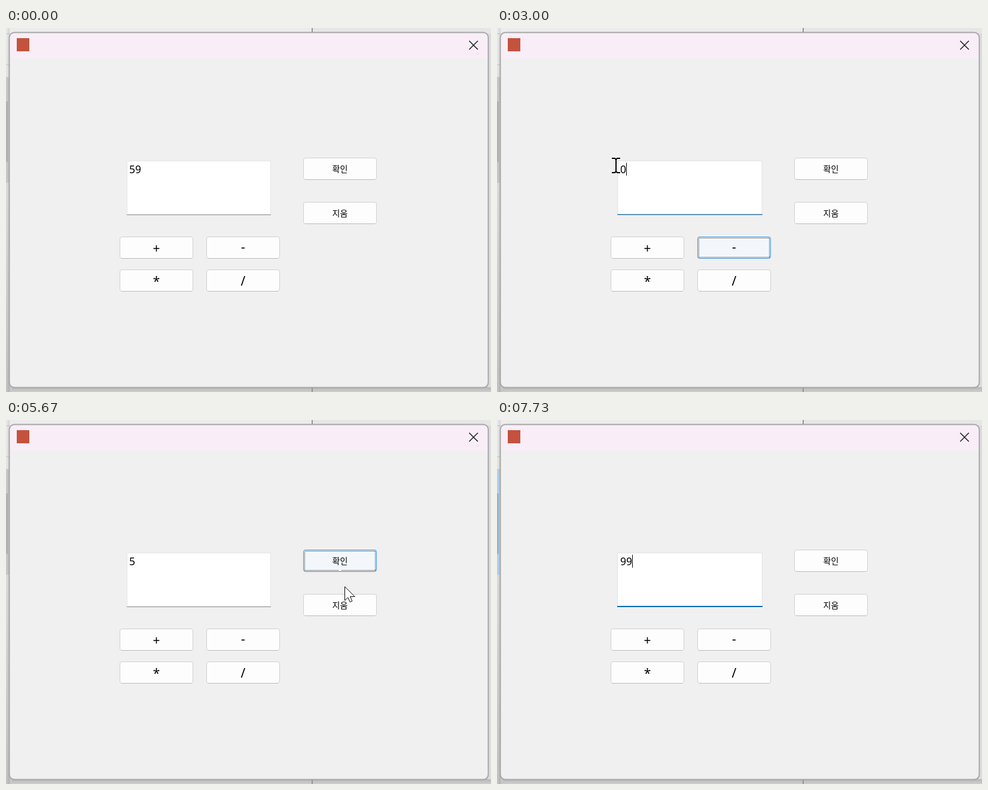
Recreate the animation shown at these times as an HTML page. Size 811 by 609 pixels, loop 8 s.

```html
<!DOCTYPE html>
<html lang="ko">
<head>
<meta charset="utf-8">
<title>Calculator dialog</title>
<style>
  html, body { margin: 0; width: 100%; height: 100%; overflow: hidden; background: #e6e6e6; }
  svg { display: block; width: 811px; height: 609px; }
  text { font-family: "Noto Sans", "Open Sans", sans-serif; font-size: 17.5px; fill: #000; }
  .label { text-anchor: middle; }
  .korean { font-family: "Noto Sans CJK KR", "Noto Sans CJK", sans-serif; font-size: 14px; }
  .sign { font-size: 21px; }
  .base { fill: #fdfdfd; stroke: #d0d0d0; }
  .edge { stroke: #bababa; }
  .default { fill: none; stroke: #0078d4; }
  .hover { fill: #e0eef9; stroke: #0078d4; }
  .press { fill: #cce4f7; stroke: #00457f; }
  .dots { fill: none; stroke: #222; stroke-dasharray: 1 1; shape-rendering: crispEdges; }
</style>
</head>
<body>
<svg id="stage" viewBox="0 0 811 609">
  <defs>
    <linearGradient id="below" x1="0" y1="0" x2="0" y2="1">
      <stop offset="0" stop-color="#b4b4b4"/><stop offset="1" stop-color="#cecece"/>
    </linearGradient>
    <linearGradient id="leftSide" x1="0" y1="0" x2="0" y2="1">
      <stop offset="0" stop-color="#ececec"/><stop offset=".45" stop-color="#dedede"/><stop offset="1" stop-color="#c6c6c6"/>
    </linearGradient>
    <linearGradient id="shade" x1="0" y1="0" x2="1" y2="0">
      <stop offset="0" stop-color="#000" stop-opacity="0"/><stop offset="1" stop-color="#000" stop-opacity=".1"/>
    </linearGradient>
  </defs>

  <!-- desktop behind the dialog -->
  <rect width="811" height="609" fill="#e6e6e6"/>
  <rect width="511" height="9" fill="#ececec"/>
  <rect y="600" width="811" height="9" fill="url(#below)"/>
  <path d="M512 0V9M512 600V609" stroke="#969696" stroke-width="2"/>
  <rect x="805" y="9" width="6" height="592" fill="#dcdcdc"/>
  <rect width="10" height="609" fill="url(#leftSide)"/>
  <path d="M0 9.500H6M0 61.500H6" stroke="#c8c8c8"/>
  <rect id="item" y="82" width="6" height="177"/>
  <rect id="thumb" y="123" width="3" height="101"/>
  <rect width="6" height="609" fill="url(#shade)"/>

  <!-- dialog -->
  <rect x="6" y="8" width="800" height="593" rx="8" fill="#f0f0f0"/>
  <path d="M6 51V16a8 8 0 0 1 8-8H798a8 8 0 0 1 8 8V51Z" fill="#f9eef7"/>
  <rect x="5.500" y="7.500" width="801" height="594" rx="8.500" fill="none" stroke="#a8a8a8" stroke-width="2"/>
  <rect x="18" y="17" width="21" height="22" fill="#c4523e"/>
  <path d="M774.500 21.500l14.500 14.500M789 21.500L774.500 36" stroke="#1a1a1a" stroke-width="1.500"/>

  <!-- edit box -->
  <rect x="202.500" y="222.500" width="240" height="90" fill="#fff" stroke="#e6e6e6"/>
  <path d="M202 312.500H443" stroke="#868686"/>
  <g id="focus">
    <rect x="201.500" y="222.500" width="242" height="90" fill="#fff" stroke="#e3e3e3"/>
    <path d="M201 312H444" stroke="#0067b8" stroke-width="2"/>
  </g>
  <rect id="selection" x="206" y="225" height="22" fill="#0078d7"/>
  <text id="value" x="206" y="243"></text>
  <rect id="caret" y="225.500" height="21.500"/>

  <g id="buttons"></g>

  <path id="arrow" d="M.5 .8V24L5.800 18.900L9.300 26.500L12.900 24.900L9.500 17.500H17.200Z" fill="#fff" stroke="#000"/>
  <path id="beam" d="M-7 -12H-2L0 -10L2 -12H7M0 -10V10M-7 12H-2L0 10L2 12H7" fill="none" stroke="#000" stroke-width="2"/>
</svg>
<script>
const LOOP = 8000, FPS = 15;
const $ = id => document.getElementById(id);
const show = (el, on) => el.setAttribute("visibility", on ? "visible" : "hidden");
const within = (k, ranges) => ranges.some(([from, to]) => k >= from && k < to);
const last = (keys, k) => keys.filter(key => key[0] <= k).pop();

// Linear value of column c in a list of [step, ...values]
function at(keys, k, c = 1) {
  const a = last(keys, k) || keys[0];
  const b = keys.find(key => key[0] > k);
  if (!b || b === a) return a[c];
  return a[c] + (b[c] - a[c]) * (k - a[0]) / (b[0] - a[0]);
}

// All times are in steps of 1/15 s
const values = [[0, "59"], [20, "1"], [23, "10"], [43, "0"], [56, "5"], [98, "0"], [113, "9"], [116, "99"]];
const selected = [[9, 20], [46, 56], [104, 113]];
const caretOn = [[8, 32], [44, 55], [56, 64], [103, 111], [113, 120]];
const editFocus = [[0, 0], [33, 0], [35, 1], [41, 1], [43, 0], [44, 0], [46, 1], [72, 1], [77, 0], [102, 0], [105, 1]];

// Pointer visits: [step, x, y, shape], each with the step at which it vanishes
const visits = [
  { end: 20, keys: [[2, 778, 324, "a"], [3, 640, 318, "a"], [4, 470, 285, "a"], [5, 390, 268, "i"],
    [6, 310, 255, "i"], [8, 232, 239, "i"], [9, 212, 241, "i"], [11, 122, 258, "i"], [12, 103, 263, "a"]] },
  { end: 56, keys: [[32, 116, 262, "a"], [34, 190, 270, "a"], [35, 235, 280, "i"], [37, 335, 305, "i"],
    [38, 382, 341, "a"], [39, 405, 358, "a"], [42, 405, 358, "a"], [43, 360, 322, "a"],
    [44, 262, 250, "i"], [45, 199, 230, "i"], [46, 115, 227, "i"], [47, 60, 224, "a"]] },
  { end: 104.5, keys: [[61, 91, 245, "a"], [64, 188, 252, "a"], [65, 230, 260, "i"], [68, 420, 262, "i"],
    [69, 475, 254, "a"], [71, 547, 242, "a"], [73, 563, 239, "a"], [81, 563, 239, "a"], [83, 564, 252, "a"],
    [87, 567, 304, "a"], [89, 567, 312, "a"], [98, 567, 312, "a"], [99, 540, 304, "a"], [100, 465, 284, "a"],
    [101, 380, 262, "i"], [103, 217, 238, "i"], [104, 90, 234, "i"]] }
];

const idle = [[0, 0]];
const buttons = [
  { x: 190, y: 349, label: "+", kind: "sign", dy: 27 },
  { x: 335, y: 349, label: "-", kind: "sign", dy: 25,
    hover: [[37, 0], [39, .55], [41, 1], [43, 1], [46, 0]],
    press: [[40, 0], [41, 1], [42, 1], [43, 0]], focus: [41, 46] },
  { x: 190, y: 404, label: "*", kind: "sign", dy: 27 },
  { x: 335, y: 404, label: "/", kind: "sign", dy: 27 },
  { x: 497, y: 217, label: "확인", kind: "korean", dy: 24,
    hover: [[69, 0], [72, 1], [83, 1], [86, 0]],
    press: [[71, 0], [72, .6], [73, .9], [75, 0]], focus: [72, 95] },
  { x: 497, y: 291, label: "지움", kind: "korean", dy: 24,
    hover: [[86, 0], [89, 1], [99, 1], [102, 0]],
    press: [[94, 0], [95, 1], [97, 1], [99, 0]], focus: [95, 104] }
];

for (const b of buttons) {
  const g = document.createElementNS("http://www.w3.org/2000/svg", "g");
  const face = name => `<rect class="${name}" x=".5" y=".5" width="122" height="36" rx="3.500"/>`;
  g.setAttribute("transform", `translate(${b.x} ${b.y})`);
  g.innerHTML = face("base") + '<path class="edge" d="M3 36.500H120"/>' +
    face("default") + face("hover") + face("press") +
    '<rect class="dots" x="2.500" y="2.500" width="118" height="32"/>' +
    `<text class="label ${b.kind}" x="61.500" y="${b.dy}">${b.label}</text>`;
  $("buttons").append(g);
  b.part = name => g.querySelector("." + name);
}

function drawButton(b, k) {
  const focused = !!b.focus && within(k, [b.focus]);
  b.part("hover").setAttribute("opacity", at(b.hover || idle, k));
  b.part("press").setAttribute("opacity", at(b.press || idle, k));
  b.part("default").setAttribute("opacity", focused ? .55 : 0);
  show(b.part("dots"), focused);
}

function drawEdit(k) {
  const text = last(values, k)[1], sel = within(k, selected), caret = $("caret");
  $("focus").setAttribute("opacity", at(editFocus, k));
  $("value").textContent = text;
  $("value").style.fill = sel ? "#fff" : "#000";
  $("selection").setAttribute("width", text.length * 10 + 1);
  show($("selection"), sel);
  caret.setAttribute("x", sel ? 206 : 206 + text.length * 10);
  caret.setAttribute("width", sel ? 1.5 : 1);
  caret.setAttribute("fill", sel ? "#ff8728" : "#000");
  show(caret, within(k, caretOn));
}

function drawPointer(k) {
  const visit = visits.find(v => k >= v.keys[0][0] && k < v.end);
  const shape = visit && last(visit.keys, k)[3];
  for (const [id, kind] of [["arrow", "a"], ["beam", "i"]]) {
    show($(id), shape === kind);
    if (shape === kind) {
      const x = Math.round(at(visit.keys, k)), y = Math.round(at(visit.keys, k, 2));
      $(id).setAttribute("transform", `translate(${x} ${y})`);
    }
  }
}

function draw(t) {
  const k = Math.floor(t * FPS / 1000 + .06);
  const lit = k >= 105;
  $("item").setAttribute("fill", lit ? "#b4d6f0" : "#cbcbcb");
  $("thumb").setAttribute("fill", lit ? "#9db9cf" : "#b4b4b4");
  drawEdit(k);
  buttons.forEach(b => drawButton(b, k));
  drawPointer(k);
}

const start = performance.now();
function tick() {
  draw((performance.now() - start) % LOOP);
  requestAnimationFrame(tick);
}
tick();
</script>
</body>
</html>
```
